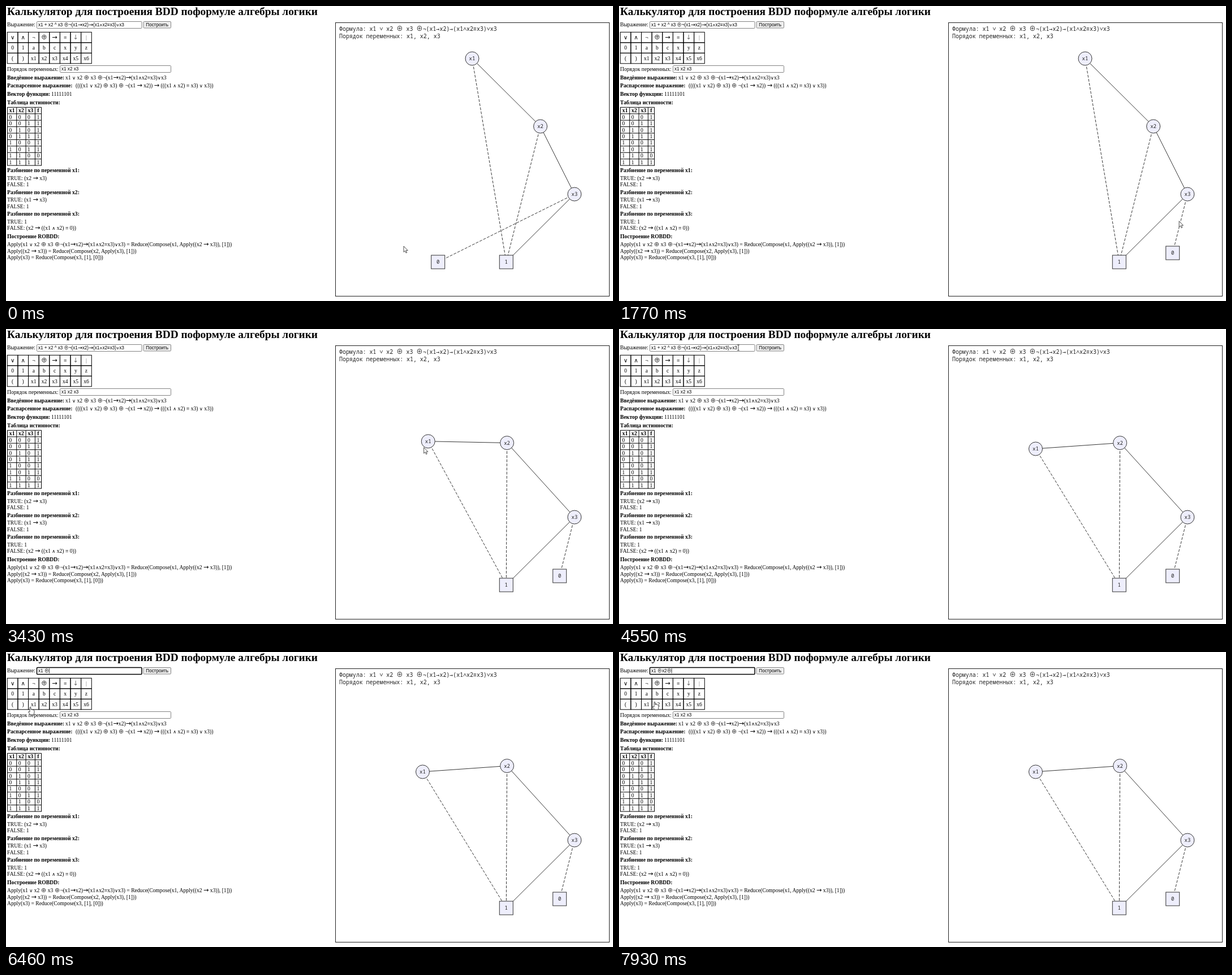
Recreate the animation shown at these times as an HTML page. Size 1073 by 522 pixels, loop 8000 ms.

```html
<!DOCTYPE html>
<html lang="ru">
<head>
<meta charset="utf-8">
<title>BDD</title>
<style>
html, body { margin: 0; width: 1073px; height: 522px; overflow: hidden; background: #fff; }
svg { display: block; }
text { font: 9.62px "Liberation Serif", "DejaVu Sans", serif; white-space: pre; }
.b { font-weight: bold; font-size: 9.72px; }
.h1 { font-weight: bold; font-size: 19.32px; }
.ui { font: 8.13px "Liberation Sans", "DejaVu Sans", sans-serif; }
.mono { font: 9.93px "Noto Sans Mono", "DejaVu Sans Mono", monospace; fill: #222; }
.node text { font-size: 9px; }
.mid { text-anchor: middle; }
.wedge { font-family: "DejaVu Sans", sans-serif; font-size: .86em; }
.key .wedge { font-size: 1.05em; }
.mono .wedge { font-family: inherit; font-size: 1em; }
.arrow { font-family: "DejaVu Sans", sans-serif; font-size: 1.17em; }
.mono .arrow { font-family: "DejaVu Sans Mono", monospace; font-size: 1em; }
.plus { font-family: "Noto Sans CJK JP", "Noto Sans CJK SC", "DejaVu Sans", sans-serif; font-size: 1em; }
.key .plus { font-size: 1.12em; }
.mono .plus { font-size: 1.14em; }
.line { fill: none; stroke: #000; }
.field { fill: #fff; stroke: #767676; stroke-width: .9; }
.focus { stroke: #000; stroke-width: 1.5; }
.edge { stroke: #2a2a2a; stroke-width: .95; }
.dash { stroke-dasharray: 4.9 2.4; }
.node circle, .node rect { fill: #eeeefc; stroke: #333; }
#cursor path { fill: #fff; stroke: #222; stroke-width: .8; stroke-linejoin: round; }
#cursor #ibeam { fill: none; }
</style>
</head>
<body>
<svg width="1073" height="522" viewBox="0 0 1073 522">
  <g id="page"></g>
  <g id="edges"></g>
  <g id="nodes"></g>
  <path id="caret" class="line" d="M0 29V37.5" stroke-width=".8"/>
  <g id="cursor">
    <path id="pointer" d="M0 0V10.4L2.4 8.2L4 12L5.7 11.3L4.1 7.6H7.3Z"/>
    <path id="ibeam" d="M-1.8-4.8H1.8M0-4.8V4.8M-1.8 4.8H1.8"/>
    <path id="hand" d="M-1 1Q0-.5 1 1V5Q2 4 3 5Q4.2 4.4 5 5.6Q6.6 5.2 7 6.8V10L6 14H0L-3.4 9.5Q-3.6 8-2 8.4L-1 9.2Z"/>
  </g>
</svg>
<script>
const $ = id => document.getElementById(id);

function set(el, attrs) {
  for (const k in attrs) el.setAttribute(k, attrs[k]);
  return el;
}
const add = (parent, tag, attrs) =>
  set(parent.appendChild(document.createElementNS('http://www.w3.org/2000/svg', tag)), attrs);

const markup = s => s
  .replace(/[∧∨]/g, '<tspan class="wedge">$&</tspan>')
  .replace(/[→↓]/g, '<tspan class="arrow">$&</tspan>')
  .replace(/⊕/g, '<tspan class="plus">$&</tspan>');

function label(x, y, s, cls = '', parent = $('page')) {
  const el = add(parent, 'text', { x, y, class: cls });
  el.innerHTML = markup(s);
  return el;
}
const box = (x, y, width, height, cls, rx = 0) =>
  add($('page'), 'rect', { x, y, width, height, rx, class: cls });
const rule = d => add($('page'), 'path', { d, class: 'line' });

// Form
const formula = 'x1 ∨ x2 ⊕ x3 ⊕¬(x1→x2)→(x1∧x2≡x3)∨x3';
const typed = formula.replace('∨', '+').replace('⊕', '^');

label(2, 16, 'Калькулятор для построения BDD поформуле алгебры логики', 'h1');
label(2, 36, 'Выражение:');
const field = box(54.5, 27.5, 185.5, 12, 'field', 1.2);
const fieldText = label(57, 36, typed, 'ui');
box(243, 27.5, 48.5, 11.5, 'field', 1.5).style.fill = '#efefef';
label(267.2, 36, 'Построить', 'ui mid');

'∨ ∧ ¬ ⊕ → ≡ ↓ | 0 1 a b c x y z ( ) x1 x2 x3 x4 x5 x6'.split(' ').forEach((key, i) => {
  const x = 2.3 + i % 8 * 18.62, y = 46.3 + (i >> 3) * 18.5;
  box(x, y, 18.62, 18.5, 'line');
  label(x + 9.3, y + 12.4, key, 'key mid').style.fill = /[↓|]/.test(key) ? '#666' : '';
});

label(2, 114.5, 'Порядок переменных:');
box(95.5, 105.5, 196, 12, 'field', 1.2);
label(98, 114.3, 'x1 x2 x3', 'ui');

// Results
[
  ['Введённое выражение:', formula, 105],
  ['Распарсенное выражение:', '((((x1 ∨ x2) ⊕ x3) ⊕ ¬(x1 → x2)) → (((x1 ∧ x2) ≡ x3) ∨ x3))', 123],
  ['Вектор функции:', '11111101', 80],
  ['Таблица истинности:', '', 0]
].forEach(([name, value, x], i) => {
  const y = 129.5 + i * 14.7;
  label(2, y, name, 'b');
  label(x, y, value);
});

const colX = c => Math.min(2.5 + c * 16.3, 62.5);
const rowY = r => 179.3 + r * 11.43;
for (let c = 0; c < 5; c++) rule(`M${colX(c)} ${rowY(0)}V${rowY(9)}`);
for (let r = 0; r < 10; r++) rule(`M2 ${rowY(r)}H63`);
['x1', 'x2', 'x3', 'f'].forEach((name, c) => {
  label((colX(c) + colX(c + 1)) / 2, rowY(0) + 9, name, 'b mid');
  for (let n = 0; n < 8; n++) {
    const bit = c < 3 ? n >> (2 - c) & 1 : +(n !== 6);
    label(colX(c) + 3, rowY(n + 1) + 9, String(bit));
  }
});

[['(x2 → x3)', '1'], ['(x1 → x3)', '1'], ['1', '(x2 → ((x1 ∧ x2) ≡ 0))']].forEach(([yes, no], i) => {
  const y = 294 + i * 38.7;
  label(2, y, `Разбиение по переменной x${i + 1}:`, 'b');
  label(2, y + 13.7, 'TRUE: ' + yes);
  label(2, y + 24.9, 'FALSE: ' + no);
});
label(2, 411, 'Построение ROBDD:', 'b');
[
  `Apply(${formula}) = Reduce(Compose(x1, Apply((x2 → x3)), [1]))`,
  'Apply((x2 → x3)) = Reduce(Compose(x2, Apply(x3), [1]))',
  'Apply(x3) = Reduce(Compose(x3, [1], [0]))'
].forEach((s, i) => label(2, 425.4 + i * 11.3, s));

// Diagram
box(582.5, 29.5, 484, 484, 'line').style.stroke = '#222';
label(589, 44, 'Формула: ' + formula, 'mono');
label(589, 57, 'Порядок переменных: x1, x2, x3', 'mono');

function node(id, col, row) {
  const el = add($('nodes'), 'g', { class: 'node' });
  if (row < 3) add(el, 'circle', { r: 12 });
  else add(el, 'rect', { x: -12, y: -12, width: 24, height: 24 });
  label(0, 3, id, 'mono mid', el);
  return { el, home: [824 + col * 60.3, 93 + row * 120] };
}
const x1 = node('x1', 0, 0), x2 = node('x2', 2, 1), x3 = node('x3', 3, 2);
const zero = node('0', -1, 3), one = node('1', 1, 3);
const nodes = [x1, x2, x3, zero, one];

const edge = (a, b, dash = '') => ({ a, b, el: add($('edges'), 'line', { class: 'edge ' + dash }) });
const edges = [
  edge(x1, x2), edge(x2, x3), edge(x3, one),
  edge(x1, one, 'dash'), edge(x2, one, 'dash'), edge(x3, zero, 'dash')
];

// Pointer moves in ms; a drag carries a node, a key types when reached
const START = [703, 425], LAG = 70, FOCUS = 4620, CLEAR = 4900;
const moves = [
  { from: 40, to: 620, at: [753, 453] },
  { from: 946, to: 1358, at: [968, 437], drag: zero },
  { from: 1530, to: 2260, at: [942, 216], bow: [40, 0] },
  { from: 2270, to: 2530, at: [883, 204.5], drag: x2 },
  { from: 2660, to: 2950, at: [825.5, 91.5] },
  { from: 3010, to: 3453, at: [738, 210.5], drag: x1 },
  { from: 3630, to: 4400, at: [211, 33], bow: [0, 100] },
  { from: 4600, to: 4820, at: [66, 41] },
  { from: 5160, to: 5700, at: [46, 94], key: 'x1 ' },
  { from: 6000, to: 6200, at: [65, 54], key: '⊕' },
  { from: 6280, to: 6450, at: [43, 97] },
  { from: 6840, to: 7060, at: [65, 92], key: 'x2' },
  { from: 7160, to: 7440, at: [65, 54], key: '⊕' },
  { from: 7700, to: 7920, at: [63, 88] }
];

const ease = u => u * u * (3 - 2 * u);
const clamp = (v, lo, hi) => Math.min(hi, Math.max(lo, v));

function pointer(t) {
  let p = START;
  for (const { from, to, at, bow = [0, 0] } of moves) {
    if (t < from) break;
    const e = ease(clamp((t - from) / (to - from), 0, 1));
    p = p.map((v, k) => v + (at[k] - v) * e + bow[k] * Math.sin(Math.PI * e));
  }
  return p;
}

const inside = ([x, y], l, t, r, b) => x > l && x < r && y > t && y < b;
const shape = p => inside(p, 2, 46, 151, 102) ? 'hand' : inside(p, 54, 27, 240, 42) ? 'ibeam' : 'pointer';
const place = (el, [x, y]) => el.setAttribute('transform', `translate(${x} ${y})`);
let shown = typed;

function draw(t) {
  const p = pointer(t), kind = shape(p);
  place($('cursor'), p);
  for (const el of $('cursor').children) el.style.display = el.id === kind ? '' : 'none';

  for (const n of nodes) n.pos = n.home;
  for (const { from, to, drag } of moves) {
    if (!drag) continue;
    const a = pointer(from), b = pointer(clamp(t - LAG, from, to));
    drag.pos = drag.home.map((v, k) => v + b[k] - a[k]);
  }
  for (const n of nodes) place(n.el, n.pos);
  for (const { a, b, el } of edges) set(el, { x1: a.pos[0], y1: a.pos[1], x2: b.pos[0], y2: b.pos[1] });

  const text = t < CLEAR ? typed : moves.filter(m => m.key && t > m.to + 40).map(m => m.key).join('');
  if (text !== shown) fieldText.innerHTML = markup(shown = text);
  const focused = t >= FOCUS;
  field.classList.toggle('focus', focused);
  $('caret').style.display = focused ? '' : 'none';
  if (focused) place($('caret'), [57.4 + (text && fieldText.getComputedTextLength()), 0]);
}

function tick() {
  draw(performance.now() % 8000);
  requestAnimationFrame(tick);
}
tick();
</script>
</body>
</html>
```
